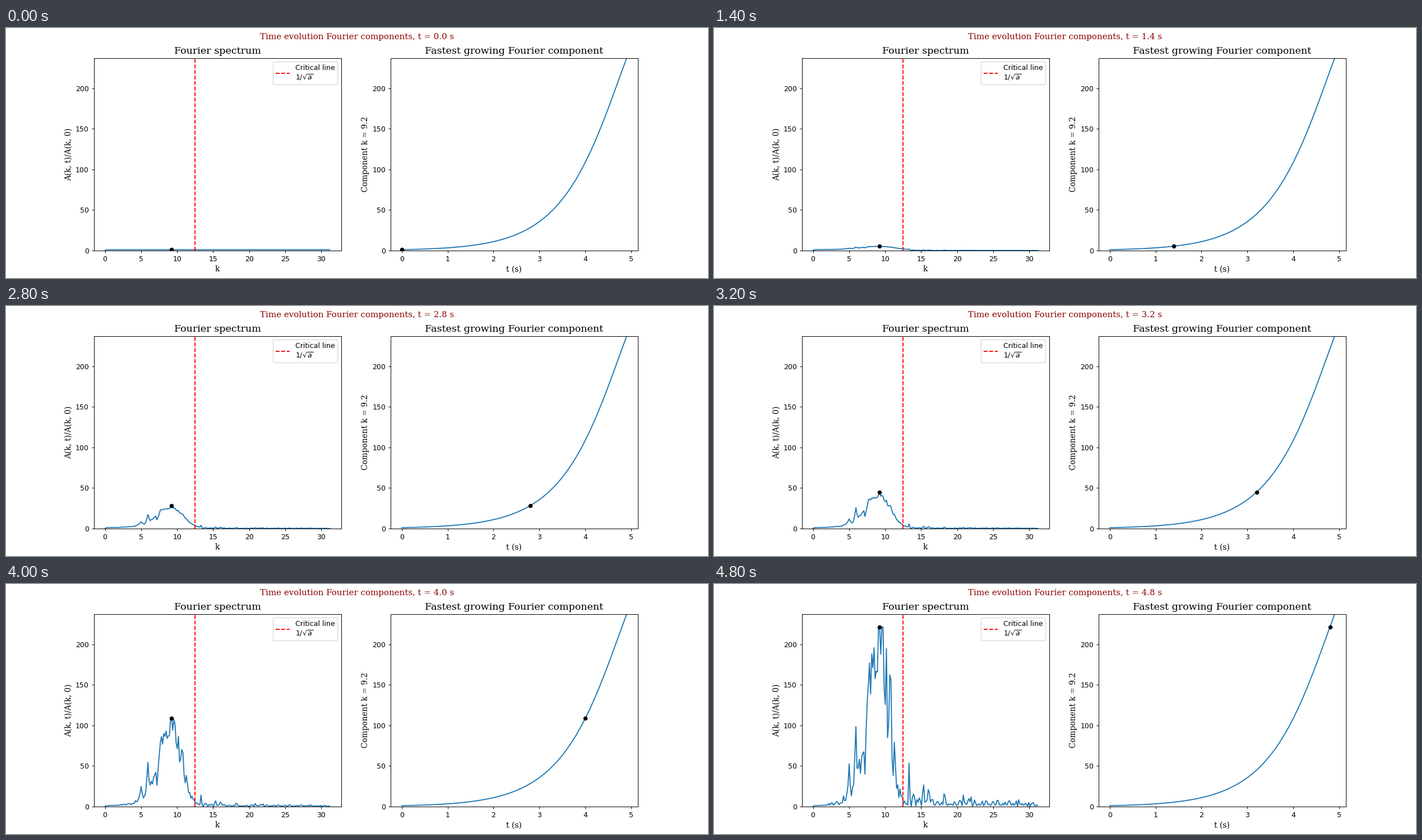
Animation, 1252 px wide and 447 px high, one loop 4.9 s. Source, as a matplotlib script:

```python
import numpy as np
import matplotlib.pyplot as plt
from matplotlib.animation import FuncAnimation

DPI = 89.4
SCALE = DPI / int(DPI)   # text is rasterised at a whole dpi
FRAMES = 49
TOP = 237.2
PEAK = 59                # fastest growing mode
TAIL = 85                # first damped mode
T_MID, T_END = 3.6, 4.8

modes = np.arange(200)
k = 0.1567 * modes
k_crit = 12.5
rng = np.random.default_rng(4)


def log_peak(t):
    """Log amplitude of the fastest mode: exponential, then saturating."""
    return 1.197 * t - np.log1p(1.181e-4 * np.exp(1.7 * t))


# Log envelope of the growing modes at T_MID
envelope = np.interp(
    modes,
    [0, 14, 26, 32, 35, 38, 40, 45, 46, 49, 58, 59, 60, 65, 70, 76, 84],
    np.log([1, 1.6, 3.5, 14, 8, 38, 18, 33, 21, 54, 61, 70.6, 62, 50, 33, 11, 2]))

# Mode coupling: roughness of the growing modes, level of the damped ones
spread = 0.1 + 0.4 * np.clip(np.abs(modes - 52) / 22, 0, 1)
rough = spread * rng.uniform(-1.5, 1.5, len(modes)) * (modes >= 14)
rough[PEAK] = 0
tail = (3 + 12 * np.exp(-(modes - TAIL) / 25)) * rng.gamma(2, 0.5, len(modes))
decay = 0.0307 * k**2 * (1 - (k / k_crit)**2)


def spectrum(t):
    u = log_peak(t)
    grown = np.exp(envelope * u / log_peak(T_MID)
                   + rough * (u / log_peak(T_END))**5)
    coupling = (0.02 * t + 0.904 * np.exp(2 * (t - T_END))) * (t > 0)
    amp = np.where(modes < TAIL, np.minimum(grown, np.exp(u)),
                   np.exp(np.minimum(decay, 0) * t) + tail * coupling)
    amp[PEAK] = np.exp(u)
    amp[0] = 0
    return amp


serif = {"family": "DejaVu Serif"}


def label(ax, title, xlabel, ylabel):
    ax.set_title(title, fontsize=14 * SCALE, **serif)
    ax.set_xlabel(xlabel, fontsize=11 * SCALE, **serif)
    ax.set_ylabel(ylabel, fontsize=11 * SCALE, **serif)
    ax.set_ylim(0, TOP)


plt.rcParams["font.size"] = 10 * SCALE
fig, (left, right) = plt.subplots(
    1, 2, figsize=(1252.01 / DPI, 447.01 / DPI), dpi=DPI)
heading = fig.suptitle("", fontsize=12 * SCALE, color="darkred", **serif)

line, = left.plot(k, spectrum(0))
left_dot, = left.plot([k[PEAK]], [1], "ko", ms=5)
left.axvline(k_crit, color="red", ls="--", label="Critical line\n$1/\\sqrt{a}$")
left.legend(loc="upper right")
label(left, "Fourier spectrum", "k", "A(k, t)/A(k, 0)")

times = np.linspace(0, 4.9, FRAMES + 1)
right.plot(times, np.exp(log_peak(times)))
right_dot, = right.plot([0], [1], "ko", ms=5)
label(right, "Fastest growing Fourier component", "t (s)",
      f"Component k = {k[PEAK]:.1f}")


def update(i):
    t = i / 10
    peak = np.exp(log_peak(t))
    line.set_ydata(spectrum(t))
    left_dot.set_data([k[PEAK]], [peak])
    right_dot.set_data([t], [peak])
    heading.set_text(f"Time evolution Fourier components, t = {t:.1f} s")
    return line, left_dot, right_dot, heading


anim = FuncAnimation(fig, update, frames=FRAMES, interval=100,
                     repeat=True, repeat_delay=0, blit=False)
plt.show()
```
